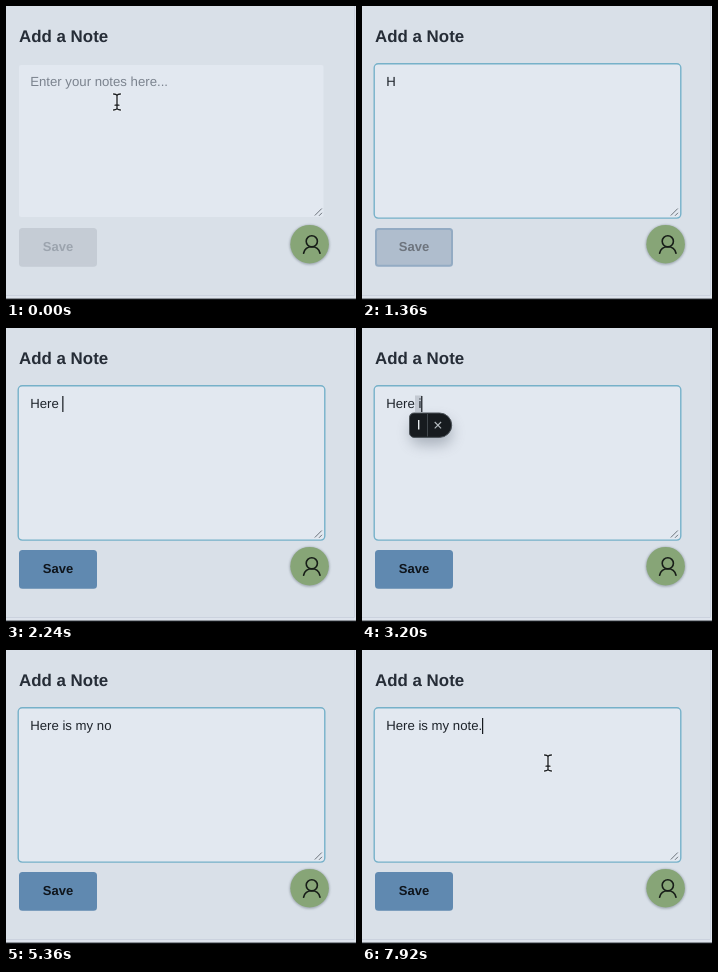
Recreate the animation shown at these times as an HTML page. Size 350x294 px, loop 8000 ms.

```html
<!DOCTYPE html>
<html lang="en">
<head>
<meta charset="utf-8">
<title>Add a Note</title>
<style>
  html, body { margin: 0; width: 100%; height: 100%; overflow: hidden; background: #d9e0e8; }
  svg { display: block; width: 100vw; height: 100vh; }
  text { font-family: "Liberation Sans", Arial, sans-serif; white-space: pre; text-rendering: geometricPrecision; }
  .bold { font-weight: 700; }
  .body { font-size: 13.2px; }
</style>
</head>
<body>
<svg viewBox="0 0 350 294" xmlns="http://www.w3.org/2000/svg">
  <defs>
    <filter id="soft" x="-60%" y="-80%" width="220%" height="300%"><feGaussianBlur stdDeviation="7"/></filter>
    <filter id="edge" x="-20%" y="-20%" width="140%" height="140%"><feGaussianBlur stdDeviation="1"/></filter>
  </defs>

  <rect width="350" height="294" fill="#d9e0e8"/>
  <path d="M348.5 0V289.5H0" fill="none" stroke="#cbd2de"/>
  <path d="M349 0h1v293H0v-3h349z" fill="#dde3ec"/>
  <rect y="292.6" width="350" height="1.4" fill="#14171b"/>

  <text class="bold" x="13" y="36" font-size="16.9" fill="#262d37">Add a Note</text>

  <rect id="field" x="13" y="59" width="304.5" height="152" rx="2" fill="#e2e8f0"/>
  <rect id="focus" x="12.2" y="57.7" width="306.6" height="154.4" rx="4" fill="#e2e8f0" stroke="#76b1c9" stroke-width="1.4"/>
  <path d="M308.8 209.5l7-7M313 209.8l3-3" stroke="#6c737b" stroke-width="1" fill="none"/>

  <rect id="mark" x="53" y="67.5" width="7" height="16.5" fill="#c3c9d2"/>
  <text id="hint" class="body" x="24.2" y="80" fill="#7b838e">Enter your notes here...</text>
  <text id="note" class="body" x="24.2" y="80" fill="#1d232a"></text>
  <rect id="caret" y="68" width="1.2" height="16" fill="#15191e"/>

  <g id="popup">
    <rect x="48" y="92" width="42" height="25" rx="11" fill="#56606f" opacity=".4" filter="url(#soft)"/>
    <path d="M52 85H77.5a12.2 12.2 0 0 1 0 24.4H52a4.5 4.5 0 0 1-4.5-4.5V89.5A4.5 4.5 0 0 1 52 85z" fill="#171b1f" stroke="#4c5359" stroke-width="1"/>
    <path d="M65.5 86v22.5" stroke="#41474c" stroke-width="1"/>
    <path d="M56.7 92v9.5" stroke="#e9edf0" stroke-width="1.4"/>
    <path d="M72.7 94l6.4 6.4m0-6.4l-6.4 6.4" stroke="#b4babf" stroke-width="1.1"/>
  </g>

  <rect id="button" x="14" y="223" width="76" height="36.8" rx="2.5" stroke-width="2"/>
  <text id="save" class="bold" x="52" y="244.5" font-size="13" text-anchor="middle">Save</text>

  <circle cx="303.6" cy="238.7" r="20" fill="#8d97a0" opacity=".75" filter="url(#edge)"/>
  <circle cx="303.6" cy="238.2" r="19.3" fill="#87a577"/>
  <g fill="none" stroke="#171d18" stroke-width="1.6" stroke-linecap="round">
    <circle cx="305.8" cy="235.3" r="5.6"/>
    <path d="M297.6 247.2C298.6 243 301.6 240.8 305.8 240.8S313 243 314 247.2"/>
  </g>

  <g id="pointer" fill="none" stroke-linecap="round">
    <path id="halo" d="M-3.4-8Q-.6-8 0-6.6Q.6-8 3.4-8M0-6.6V6.6M-3.4 8Q-.6 8 0 6.6Q.6 8 3.4 8M-2 3.2H2" stroke="#f4f6f9" stroke-width="2.6"/>
    <path d="M-3.4-8Q-.6-8 0-6.6Q.6-8 3.4-8M0-6.6V6.6M-3.4 8Q-.6 8 0 6.6Q.6 8 3.4 8M-2 3.2H2" stroke="#14181c" stroke-width="1.3"/>
  </g>
</svg>
<script>
  const LOOP = 8000, STEP = 80, LEFT = 24.2;
  const NOTE = "Here is my note.";
  // When each character of the note is typed.
  const KEYS = [1360, 1760, 1840, 2000, 2240, 2640, 3280, 3440, 3680, 4000, 4160, 4480, 4880, 5760, 6000, 6800];
  // Spans in which the caret is blinked off.
  const BLINKS = [[0, 240], [560, 960], [1360, 1440], [3040, 3200], [5360, 5760], [6480, 6800], [7200, 7680]];
  // Pointer stops: time, x, y.
  const TRAIL = [[0, 111, 96], [160, 111, 95], [240, 110, 93], [320, 110, 92], [7680, 111, 92], [7840, 150, 104], [7920, 186, 113]];

  const $ = id => document.getElementById(id);
  const set = (id, attrs) => { for (const k in attrs) $(id).setAttribute(k, attrs[k]); };
  const show = (id, on) => set(id, { visibility: on ? "visible" : "hidden" });
  const within = (t, a, b) => t >= a && t < b;
  const ramp = (t, a, b) => Math.min(1, Math.max(0, (t - a) / (b - a)));
  const mix = (a, b, k) => `rgb(${a.map((v, i) => Math.round(v + (b[i] - v) * k))})`;

  function draw(ms) {
    const t = Math.floor(ms / STEP) * STEP;
    const typed = KEYS.filter(k => k <= t).length;

    set("focus", { opacity: ramp(t, 80, 320) });
    show("hint", typed === 0);
    $("note").textContent = NOTE.slice(0, typed);
    const end = typed ? $("note").getComputedTextLength() : 0;
    set("caret", { x: LEFT + end - 0.2 });
    show("caret", !BLINKS.some(([a, b]) => within(t, a, b)));

    const popup = within(t, 3200, 3280);
    show("popup", popup);
    show("mark", popup);

    const fade = ramp(t, 1320, 1520);
    const grey = [197, 204, 213], blue = [96, 137, 176];
    set("button", {
      fill: mix(grey, blue, t < 1520 ? fade * 1.1 : 1),
      stroke: mix(grey, blue, ramp(t, 1280, 1440))
    });
    set("save", { fill: mix([156, 164, 174], [15, 21, 28], ramp(t, 1300, 1480)) });

    const [, x, y] = TRAIL.filter(p => p[0] <= t).pop();
    set("pointer", { transform: `translate(${x} ${y})` });
    show("pointer", t < 1360 || t >= 7680);
  }

  function tick() {
    draw(performance.now() % LOOP);
    requestAnimationFrame(tick);
  }
  tick();
</script>
</body>
</html>
```
